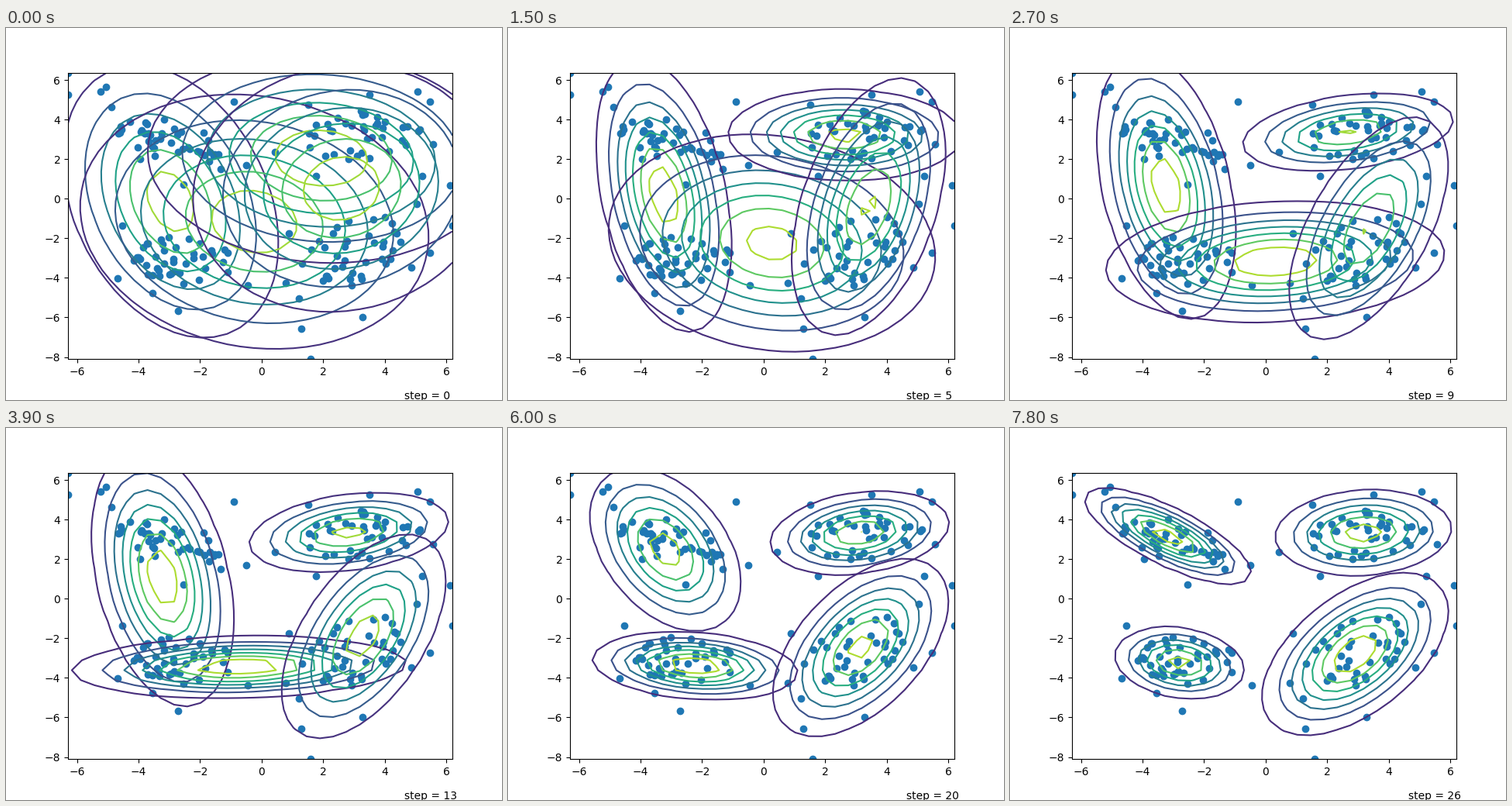
Animation of 640x480 px, one loop 8 s. Source, as a matplotlib script:

```python
import numpy as np
import matplotlib.pyplot as plt
from matplotlib.animation import FuncAnimation

XLIM, YLIM = (-6.29, 6.19), (-8.105, 6.37)
STEP_MS, TICK_MS, LOOP_MS = 300, 100, 8000

# The most isolated samples; the clouds between them are drawn at random.
OUTLIERS = [
    (-6.29, 6.37), (-6.28, 5.26), (-5.23, 5.41), (-5.06, 5.65), (-4.88, 4.63),
    (-4.66, 3.3), (-3.95, 2.01), (-.91, 4.9), (-.51, 1.69), (-1.33, 1.5),
    (-2.54, .72), (-4.53, -1.36), (-4.68, -4.02), (-3.55, -4.77),
    (-2.72, -5.67), (-.45, -4.37), (.88, -1.75), (.78, -4.25), (1.2, -5.04),
    (1.28, -6.57), (1.58, -8.1), (3.27, -5.98), (4.85, -3.47), (5.46, -2.73),
    (5.03, -.26), (6.11, .68), (6.19, -1.36), (5.2, 1.14), (1.51, 4.75),
    (3.49, 5.26), (5.05, 5.41), (5.46, 4.91), (.43, 2.36), (1.76, 1.14),
    (5.56, 2.75),
]

# Clouds: centre x, centre y, half width, half height, shear, count
CLOUDS = [
    (-3.0, 3.0, 1.7, 1.1, -.4, 38),
    (-2.6, -3.1, 1.7, 1.2, -.1, 41),
    (2.9, -2.7, 1.7, 1.7, .5, 37),
    (3.3, 3.2, 1.9, 1.3, .15, 38),
]

# Per component, by step: mean x, mean y, sigma x, sigma y, rho
UPPER_LEFT = {
    0: (-2.957, -.145, 1.796, 3.54, -.31),
    5: (-3.247, .188, 1.083, 3.42, -.37),
    13: (-3.222, 1.068, 1.133, 3.218, -.33),
    17: (-3.222, 1.774, 1.165, 2.93, -.28),
    22: (-3.171, 2.967, 1.318, 1.6, -.5),
    26: (-3.184, 3.163, 1.334, 1.2, -.76),
}
LOWER_LEFT = {
    0: (-.241, -1.163, 2.894, 3.29, -.12),
    5: (.261, -2.24, 2.65, 2.744, -.13),
    9: (.312, -3.18, 2.696, 1.5, .13),
    13: (-.732, -3.454, 2.656, .75, .12),
    17: (-1.587, -3.513, 2.22, .76, -.12),
    22: (-2.656, -3.317, 1.234, .878, -.25),
    26: (-2.794, -3.239, 1.079, .931, -.2),
}
UPPER_RIGHT = {
    0: (1.934, 2.048, 2.867, 2.69, -.06),
    5: (2.626, 3.222, 1.889, 1.146, -.03),
    9: (2.664, 3.36, 1.79, 1.02, .31),
    22: (3.192, 3.32, 1.403, 1.072, .22),
    26: (3.167, 3.34, 1.466, 1.11, .1),
}
LOWER_RIGHT = {
    0: (2.589, .52, 2.453, 3.18, .08),
    5: (3.405, -.4, 1.25, 3.27, .42),
    9: (3.343, -1.496, 1.349, 2.954, .57),
    17: (3.267, -2.31, 1.385, 2.36, .52),
    26: (2.903, -2.79, 1.483, 2.019, .53),
}


def sample_points():
    rng = np.random.default_rng(4)
    clouds = [np.array(OUTLIERS)]
    for cx, cy, half_w, half_h, shear, count in CLOUDS:
        angle = rng.uniform(0, 2 * np.pi, count)
        radius = rng.uniform(0, 1, count) ** .65
        dx = half_w * radius * np.cos(angle)
        dy = half_h * radius * np.sin(angle) + shear * dx
        clouds.append(np.column_stack([cx + dx, cy + dy]))
    return np.vstack(clouds)


def density(x, y, mx, my, sx, sy, rho):
    u, v = (x - mx) / sx, (y - my) / sy
    rest = 1 - rho ** 2
    peak = 1 / (2 * np.pi * sx * sy * np.sqrt(rest))
    return peak * np.exp(-(u * u - 2 * rho * u * v + v * v) / (2 * rest))


def pose(keys, step):
    return [np.interp(step, list(keys), column) for column in zip(*keys.values())]


fig, ax = plt.subplots(figsize=(6.4, 4.8), dpi=100)
ax.scatter(*sample_points().T)
ax.set(xlim=XLIM, ylim=YLIM)
label = ax.text(XLIM[1] * .75, YLIM[0] * 1.25, "")
grid_x, grid_y = np.meshgrid(np.linspace(*XLIM, 30), np.linspace(*YLIM, 30))
contours = []


def draw(tick):
    step = tick * TICK_MS // STEP_MS
    while contours:
        contours.pop().remove()
    for keys in (UPPER_LEFT, LOWER_LEFT, UPPER_RIGHT, LOWER_RIGHT):
        z = density(grid_x, grid_y, *pose(keys, step))
        contours.append(ax.contour(grid_x, grid_y, z))
    ax.set(xlim=XLIM, ylim=YLIM)
    label.set_text(f"step = {step}")


anim = FuncAnimation(fig, draw, frames=LOOP_MS // TICK_MS, interval=TICK_MS,
                     init_func=lambda: None, repeat=True, repeat_delay=0)
plt.show()
```
